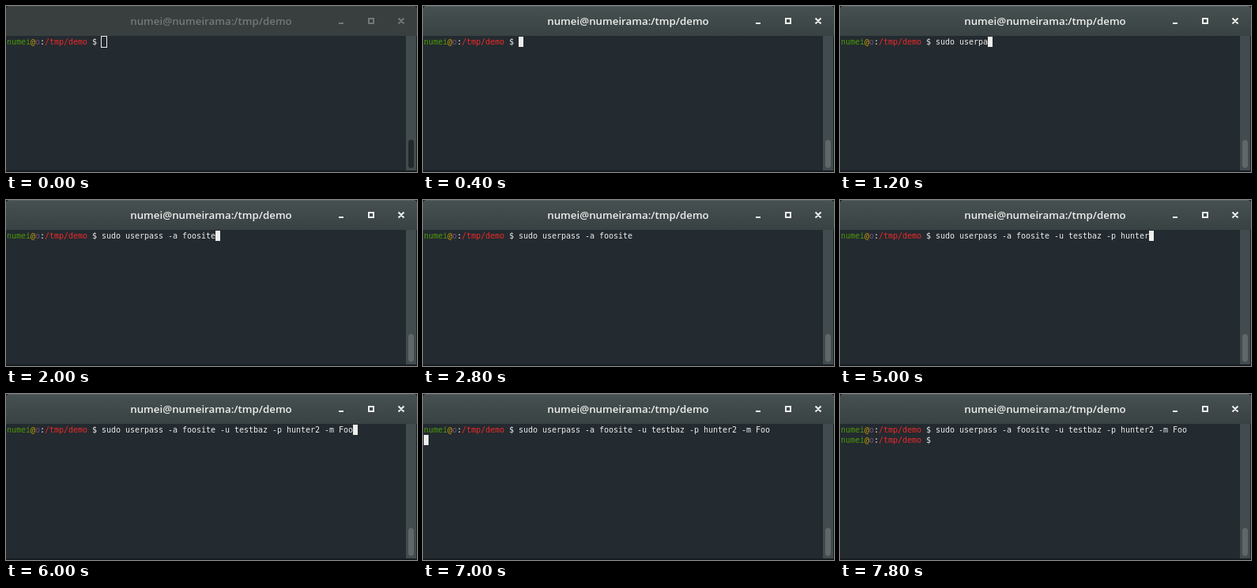
Recreate the animation shown at these times as an HTML page. Size 520 px wide and 211 px high, loop 8 s.

```html
<!DOCTYPE html>
<html lang="en">
<head>
<meta charset="utf-8">
<title>Terminal</title>
<style>
html, body { margin: 0; width: 100%; height: 100%; overflow: hidden; background: #232a30; }
#stage { position: relative; width: 520px; height: 211px; overflow: hidden; background: #232a30; }
#stage div, #stage svg { position: absolute; }

.corners { left: 0; top: 0; width: 520px; height: 8px; background: #1c2021; }
.bar { left: 0; top: 0; width: 520px; height: 38px; box-sizing: border-box; border-radius: 5px 5px 0 0; }
.idle { background: #393f3f; border-top: 1px solid #444949; }
.active { background: linear-gradient(#465051, #394243); border-top: 1px solid #566060; }
.title { left: 0; top: 10px; width: 519px; text-align: center; white-space: pre;
  font: 600 13.3px/18px "Open Sans", "Noto Sans", sans-serif; }
.idle-ink { color: #737777; }
.active-ink { color: #eeeeec; }

.trough { left: 506px; top: 38px; width: 13px; height: 171px; background: #424b4d; }
.thumb { left: 509px; top: 170px; width: 7px; height: 36px; border-radius: 4px; }
.edge-right { left: 519px; top: 38px; width: 1px; height: 173px; background: #1a2021; }
.edge-bottom { left: 0; top: 209px; width: 520px; height: 2px; background: #171c1f; }

.line { left: 1px; white-space: pre; color: #eeeeec; letter-spacing: -0.02px;
  font: 10px/13px "DejaVu Sans Mono", monospace; }
.user { color: #4e9a06; }
.at { color: #c4a000; }
.host { color: #75507b; }
.path { color: #ef2929; }
#cursor { width: 6px; height: 13px; box-sizing: border-box; background: #eeeeec; }
#cursor.hollow { width: 8px; height: 15px; margin: -1px; background: none; border: 1px solid #eeeeec; }
</style>
</head>
<body>
<div id="stage">
  <div class="corners"></div>
  <div class="bar idle"></div>
  <div class="trough"></div>
  <div class="thumb" style="background:#23292b"></div>
  <div class="title idle-ink">numei@numeirama:/tmp/demo</div>
  <svg class="idle-ink" width="520" height="38"><use href="#buttons"/></svg>

  <div id="focus">
    <div class="bar active"></div>
    <div class="thumb" style="background:#5f6768"></div>
    <div class="title active-ink">numei@numeirama:/tmp/demo</div>
    <svg class="active-ink" width="520" height="38">
      <g id="buttons" fill="none" stroke="currentColor" stroke-width="2">
        <path d="M421 22h6M459 16h6v6h-6zM496.5 15.5l7 7m0-7l-7 7"/>
      </g>
    </svg>
  </div>

  <div class="edge-right"></div>
  <div class="edge-bottom"></div>

  <div id="cursor"></div>
  <div class="line" style="top:39px"><span class="user">numei</span><span class="at">@</span><span class="host">o</span>:<span class="path">/tmp/demo</span> $ <span id="typed"></span></div>
  <div class="line" id="next" style="top:52px"><span class="user">numei</span><span class="at">@</span><span class="host">o</span>:<span class="path">/tmp/demo</span> $ </div>
</div>
<script>
const LOOP = 8000, STEP = 200, CELL = 6, ROW = 13, PROMPT = 20;
const COMMAND = "sudo userpass -a foosite -u testbaz -p hunter2 -m Foo";
const ENTER = 7000, READY = 7200;

// Typing bursts: first step time, then the length reached at each step.
const BURSTS = [
  [800, [4, 7, 11, 14, 18, 21, 24]],
  [3200, [26, 29, 32, 35]],
  [4400, [36, 39, 42, 45, 46, 47, 49, 51, 53]]
];
// Cursor blinks off at these times for one step.
const OFF = [2400, 2800, 4200, 6400, 6800, 7400, 7800];

const $ = id => document.getElementById(id);
const focus = $("focus"), typed = $("typed"), next = $("next"), cursor = $("cursor");

function typedLength(t) {
  let n = 0;
  for (const [start, lengths] of BURSTS) {
    if (t >= start) n = lengths[Math.min((t - start) / STEP, lengths.length - 1)];
  }
  return n;
}

function draw(now) {
  const t = Math.floor((now % LOOP) / STEP) * STEP;
  const n = typedLength(t);
  const column = t >= READY ? PROMPT : t >= ENTER ? 0 : PROMPT + n;

  focus.style.opacity = Math.min(t / 400, 1);
  typed.textContent = COMMAND.slice(0, n);
  next.style.visibility = t >= READY ? "visible" : "hidden";
  cursor.className = t < 200 ? "hollow" : "";
  cursor.style.left = 1 + column * CELL + "px";
  cursor.style.top = 39 + (t >= ENTER ? ROW : 0) + "px";
  cursor.style.visibility = OFF.includes(t) ? "hidden" : "visible";
}

const begin = performance.now();
function tick() {
  draw(performance.now() - begin);
  requestAnimationFrame(tick);
}
tick();
</script>
</body>
</html>
```
